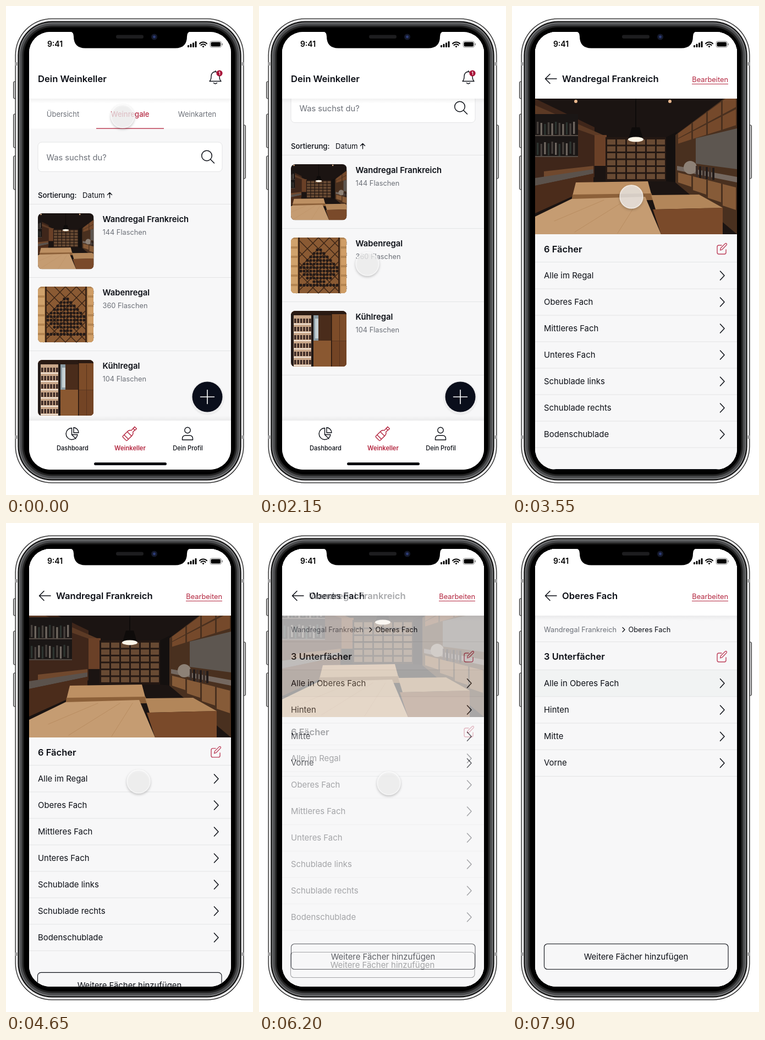
Recreate the animation shown at these times as an HTML page. Size 449 by 887 pixels, loop 8000 ms.

```html
<!DOCTYPE html>
<html lang="de">
<head>
<meta charset="utf-8">
<title>Weinkeller</title>
<style>
html, body { margin: 0; width: 100%; height: 100%; overflow: hidden; background: #fff; }
svg { display: block; font-family: Inter, sans-serif; }
#touch { filter: drop-shadow(0 2.5px 2px rgba(0, 0, 0, .28)); }
</style>
</head>
<body>
<svg id="stage" width="449" height="887" viewBox="0 0 449 887"></svg>
<script>
(() => {
const INK = '#0b0e15', GRAY = '#6c7078', RED = '#b3263f', LINE = '#e3e4e5', PAGE = '#f7f7f8';

// Drawing helpers, each returns SVG markup
const rect = (x, y, w, h, fill, r = 0, more = '') =>
  `<rect x="${x}" y="${y}" width="${w}" height="${h}" rx="${r}" fill="${fill}" ${more}/>`;
const circle = (x, y, r, fill, more = '') => `<circle cx="${x}" cy="${y}" r="${r}" fill="${fill}" ${more}/>`;
const text = (x, y, str, size, weight = 400, fill = INK, anchor = 'start') =>
  `<text x="${x}" y="${y}" font-size="${size}" font-weight="${weight}" fill="${fill}" text-anchor="${anchor}">${str}</text>`;
const stroke = (d, color = INK, w = 1.5) =>
  `<path d="${d}" fill="none" stroke="${color}" stroke-width="${w}" stroke-linecap="round" stroke-linejoin="round"/>`;
const poly = (pts, fill) => `<path d="M${pts}z" fill="${fill}"/>`;
const rule = y => rect(42, y, 367, 1, LINE);
const group = (id, body) => `<g id="${id}">${body}</g>`;
const times = (n, fn) => Array.from({ length: n }, (_, i) => fn(i)).join('');
const grid = (x, y, cols, rows, dx, dy, w, h, fill) =>
  times(cols * rows, i => rect(x + i % cols * dx, y + Math.floor(i / cols) * dy, w, h, fill));

// Photos as flat scenes
function room() {
  const upper = x => 66 - (x - 255) * .75, lower = x => 84 - (x - 255) * .3;
  const crate = (a, b, p, q) => {
    const y = (x, f) => upper(x) + (lower(x) - upper(x)) * f;
    return poly(`${a} ${y(a, p)}L${b} ${y(b, p)} ${b} ${y(b, q)} ${a} ${y(a, q)}`, '#75492b');
  };
  return rect(0, 0, 367, 246, '#1b1412')
    + poly('0 0L108 52 108 142 0 200', '#3f261a')
    + poly('0 12L128 68 128 74 0 28', '#5c3a25')
    + rect(0, 28, 78, 78, '#1a1615')
    + times(22, i => rect(3 + i % 11 * 6.6, (i < 11 ? 42 : 78) + i * 7 % 5, 3.4, 22, ['#46403c', '#6d655e', '#2d3430'][i % 3]))
    + rect(0, 66, 78, 2, '#554b44') + rect(0, 104, 78, 2, '#554b44')
    + rect(108, 66, 22, 56, '#6a4027')
    + poly('16 132L106 122 106 132 16 146', '#70482d')
    + poly('0 144L106 128 106 136 0 158', '#5b524c')
    + poly('0 158L106 136 106 160 0 208', '#4b2c1b')
    + rect(128, 70, 130, 80, '#241813') + grid(131, 74, 7, 6, 18, 12.5, 15, 9.5, '#684a33')
    + poly('238 70L258 60 258 152 238 150', '#14100f')
    + poly('255 66L367 -18 367 246 255 152', '#49301f')
    + times(4, i => { const a = 260 + i * 27; return crate(a, a + 24, .04, .47) + crate(a, a + 24, .53, .96); })
    + poly('292 72L367 54 367 128 292 118', '#5d5650')
    + poly('258 122L367 142 367 152 258 130', '#746860')
    + circle(282, 125, 12, '#8d8176')
    + times(6, i => rect(292 + i * 6, 122 + i * .7, 4, 22, i % 2 ? '#221b1a' : '#3a2d28'))
    + times(4, i => poly(`${260 + i * 27} ${134 + i * 7}l24 6v${20 + i * 7}l-24 -8`, '#865b38'))
    + poly('68 176L74 152 205 150 212 176', '#bd9063')
    + poly('68 174L212 172 214 184 66 186', '#8c6039')
    + poly('0 214L66 182 200 178 229 246 0 246', '#c59c72')
    + stroke('M35 222L125 184M72 242L165 184M150 244L188 184', '#b98d61', 1)
    + poly('211 175L298 174 341 198 219 201', '#b2865a')
    + poly('214 201L341 198 341 246 229 246', '#7a4a2a')
    + rect(182, 0, 2, 58, '#0e0b0a') + poly('170 72L176 52 190 52 196 72', '#0e0b0a')
    + '<ellipse cx="183" cy="74" rx="14" ry="4.5" fill="#fff6e8"/>'
    + circle(74, 5, 3, '#e9b78d') + circle(245, 5, 3, '#e9b78d');
}

function lattice() {
  const diagonals = times(9, i => stroke(`M${i * 20 - 50} 0l100 101M${i * 20 - 50} 101l100 -101`, '#3a2416', 1.4));
  const bottles = times(144, i => {
    const x = 18 + i % 12 * 6, y = 16 + Math.floor(i / 12) * 6.4;
    return Math.abs(x - 51) + Math.abs(y - 55) < 40 || y > 82 ? circle(x, y, 2.6, '#241a17') : '';
  });
  return rect(0, 0, 101, 101, '#8a5a33') + diagonals + bottles
    + rect(0, 0, 13, 101, '#b48552') + grid(0, 3, 1, 6, 0, 17, 12, 13, '#d0a26c')
    + rect(89, 0, 12, 101, '#b48552') + grid(91, 3, 1, 6, 0, 17, 10, 13, '#cf9d66')
    + rect(13, 0, 3, 101, '#3c2517') + rect(86, 0, 3, 101, '#3c2517');
}

function cooler() {
  return rect(0, 0, 101, 101, '#5d3922') + rect(0, 0, 101, 8, '#2a1a13')
    + rect(0, 8, 38, 93, '#c9a78a') + grid(6, 14, 6, 6, 5.4, 15, 3.6, 8, '#3d2a25')
    + grid(5, 23, 1, 6, 0, 15, 34, 2, '#f0e3d6')
    + rect(0, 6, 5, 95, '#241b19') + rect(37, 6, 4, 95, '#1f1715')
    + rect(41, 8, 12, 50, '#8a99a1') + rect(44, 14, 6, 36, '#c5d0d4')
    + rect(41, 54, 33, 47, '#8a5831') + rect(50, 8, 23, 46, '#4a2c1b')
    + rect(74, 6, 27, 48, '#7d4c29') + rect(74, 55, 27, 46, '#734425')
    + rect(73, 0, 1.5, 101, '#24150e') + rect(88, 8, 1, 93, '#5a341d');
}

const roomPhoto = (x, y, w, h) =>
  `<svg x="${x}" y="${y}" width="${w}" height="${h}" viewBox="0 0 367 246" preserveAspectRatio="xMidYMid slice">${room()}</svg>`;

// Shared interface parts
const header = rect(42, 40, 367, 128, '#fff');
const shade = rect(42, 168, 367, 9, 'url(#down)');
const back = stroke('M81 132H60.5M69 123.5L60.5 132 69 140.5');
const edit = text(393, 138, 'Bearbeiten', 12.8, 400, RED, 'end') + rect(327, 141, 66, 1, RED);
const pencil = y => stroke(`M381 ${y - 7}h-5q-3 0 -3 3v10q0 3 3 3h10q3 0 3 -3v-5`, '#bd3f5a', 1.4)
  + stroke(`M378.5 ${y + 2}l1 -4 8 -8q1.5 -1 2.5 0t0 2.5l-8 8.3z`, '#bd3f5a', 1.3);
const row = (y, label) => text(58, y + 5.5, label, 14.9) + stroke(`M378.5 ${y - 7.5}l7.5 8 -7.5 8`) + rule(y + 24);
const addButton = (x, y) => rect(x + .5, y + .5, 334.5, 46, 'none', 6, `stroke="${INK}" stroke-width="1.1"`)
  + text(x + 167.5, y + 29, 'Weitere Fächer hinzufügen', 14.9, 400, INK, 'middle');

const shelf = (i, name, count, art) => {
  const y = 359 + i * 133;
  return `<g transform="translate(58 ${y + 17})" clip-path="url(#thumb)">${art}</g>`
    + text(175.5, y + 33, name, 14.8, 600) + text(175.5, y + 56, count + ' Flaschen', 12.8, 400, GRAY) + rule(y + 133);
};

const bell = stroke('M370 136.5q3 -2.5 3 -9c0 -11 15 -11 15 0q0 6.5 3 9zM377.5 139.5q3 3 6 0M380.5 119v-1.5', INK, 1.4)
  + circle(388, 122, 5.6, '#a8163a') + text(388, 125, '1', 8, 600, '#fff', 'middle');
const bottle = stroke('M-2.5 -15h5v4h-5zM-2 -11v5q-3.5 2 -3.5 6v12q0 1.5 1.5 1.5h8q1.5 0 1.5 -1.5v-12q0 -4 -3.5 -6v-5M-5.5 1h11v8h-11', RED, 1.4);
const nav = rect(42, 743, 367, 9, 'url(#up)') + rect(42, 752, 367, 92, '#fff')
  + stroke('M119.5 765.5a10.5 10.5 0 1 0 10.5 12h-10.5zM119.5 777.5l7.5 7.5M123 764.5a10 10 0 0 1 9 9.5h-9z', INK, 1.4)
  + `<g transform="translate(225 775.5) rotate(45)">${bottle}</g>`
  + circle(330, 769.5, 5.2, 'none', `stroke="${INK}" stroke-width="1.4"`)
  + stroke('M320.5 787v-2q0 -6 6 -6h7q6 0 6 6v2z', INK, 1.4)
  + text(121, 806, 'Dashboard', 11.1, 500, INK, 'middle') + text(225.5, 806, 'Weinkeller', 11.2, 600, RED, 'middle')
  + text(330.5, 806, 'Dein Profil', 11.1, 500, INK, 'middle') + rect(160, 828, 132, 5, '#080a10', 2.5);

const cellar = rect(42, 40, 367, 804, PAGE)
  + group('cellarScroll', rect(42, 168, 367, 54.5, '#fff')
    + text(103.5, 201, 'Übersicht', 13, 400, GRAY, 'middle') + text(225.5, 201, 'Weinregale', 13, 500, RED, 'middle')
    + text(347.5, 201, 'Weinkarten', 13, 400, GRAY, 'middle') + rect(164, 221.5, 123, 1.3, RED)
    + rect(58, 247, 335, 53.5, '#fff', 7, `stroke="${LINE}"`) + text(73.5, 279.5, 'Was suchst du?', 14.7, 400, GRAY)
    + circle(365, 271.5, 9.3, 'none', `stroke="${INK}" stroke-width="1.5"`) + stroke('M372 278.5l6.5 6.5')
    + text(58, 348, 'Sortierung:', 13.2, 500) + text(139, 348, 'Datum', 13.2) + stroke('M188.5 348v-9.5M184.5 342.5l4 -4 4 4', INK, 1.3)
    + rule(359)
    + shelf(0, 'Wandregal Frankreich', 144, roomPhoto(0, 0, 101.5, 101.5))
    + shelf(1, 'Wabenregal', 360, lattice()) + shelf(2, 'Kühlregal', 104, cooler()))
  + shade + header + text(58, 138, 'Dein Weinkeller', 16.6, 600) + bell
  + circle(366, 711, 31, '#000', 'opacity=".04"') + circle(366, 709, 27.5, '#0a0e1b')
  + stroke('M353.5 709h25M366 696.5v25', '#fff', 1.6) + nav;

const rack = rect(42, 40, 367, 804, PAGE)
  + group('rackScroll', roomPhoto(42, 168, 367, 246)
    + text(58, 447, '6 Fächer', 16.5, 600) + pencil(441) + rule(464)
    + ['Alle im Regal', 'Oberes Fach', 'Mittleres Fach', 'Unteres Fach', 'Schublade links', 'Schublade rechts', 'Bodenschublade']
      .map((label, i) => row(488.5 + i * 48, label)).join('') + addButton(57, 840))
  + header + back + text(91, 138, 'Wandregal Frankreich', 16.6, 600) + edit;

const shelfPage = rect(42, 40, 367, 804, PAGE) + shade + header + back + text(91, 138, 'Oberes Fach', 16.6, 600) + edit
  + text(58, 197.5, 'Wandregal Frankreich', 12.8, 400, GRAY) + stroke('M201 189.5l4 4 -4 4', INK, 1.3)
  + text(211.5, 197.5, 'Oberes Fach', 12.8) + rule(215)
  + text(58, 248, '3 Unterfächer', 16.5, 600) + pencil(243) + rule(266) + rect(42, 267, 367, 47, '#f1f3f3')
  + ['Alle in Oberes Fach', 'Hinten', 'Mitte', 'Vorne'].map((label, i) => row(290.3 + i * 48.2, label)).join('')
  + addButton(58, 763);

// Phone body, from the outside in
const shell = [[0, '#1c1c1c'], [1.3, '#eeeeef'], [5, '#050505'], [7, '#77787a'], [9, '#4b4c4e'], [13, '#222'], [16, '#000']];
const side = (x, y, h) => rect(x, y, 5, h, '#c9c9ca', 2, 'stroke="#222"');
const phone = side(13.5, 137, 31) + side(13.5, 196, 61) + side(13.5, 272, 61) + side(430.5, 216, 97)
  + shell.map(([d, c]) => rect(16.5 + d, 22.5 + d, 416 - 2 * d, 843 - 2 * d, c, 67 - d)).join('')
  + [102, 779].map(y => rect(16, y, 5.5, 6, '#a3a3a4') + rect(427.5, y, 5.5, 6, '#a3a3a4')).join('');
const statusBar = '<path d="M116 46q7 1 7 9c0 14 7 21.5 21 21.5h164c14 0 21 -7.5 21 -21.5q0 -8 7 -9z"/>'
  + rect(200, 52.5, 50, 6.5, '#1d1d1f', 3.2) + circle(269.5, 56, 5.5, '#151a2c') + circle(269.5, 56, 2.4, '#2d3d78')
  + text(89, 74, '9:41', 14, 600, '#000', 'middle')
  + times(4, i => rect(330 + i * 4.5, 71 - i * 2.3, 3, 4 + i * 2.3, '#000', 1))
  + stroke('M352 68.3a9 9 0 0 1 13 0M354.4 71a5.6 5.6 0 0 1 8.2 0', '#000', 2)
  + poly('356.5 73.2l2 2.2 2 -2.2a3 3 0 0 0 -4 0', '#000')
  + rect(371, 64, 20.5, 11, 'none', 3.3, 'stroke="#8b8b8b"') + rect(372.5, 65.5, 17.5, 8, '#000', 2) + rect(392.5, 67.5, 1.6, 4, '#8b8b8b', .8);

const fade = (id, y1, y2) => `<linearGradient id="${id}" x1="0" x2="0" y1="${y1}" y2="${y2}">`
  + '<stop stop-opacity=".05"/><stop offset="1" stop-opacity="0"/></linearGradient>';

document.getElementById('stage').innerHTML = `<defs>${fade('down', 0, 1)}${fade('up', 1, 0)}
  <clipPath id="screen">${rect(42, 47, 367, 794, '#000', 38)}</clipPath>
  <clipPath id="thumb">${rect(0, 0, 101.5, 101.5, '#000', 8)}</clipPath></defs>`
  + phone + `<g clip-path="url(#screen)">${group('cellar', cellar)}${group('rack', rack)}${group('shelfPage', shelfPage)}
  ${group('touch', circle(0, 0, 21, 'rgba(250,250,250,.74)', 'stroke="#fff" stroke-opacity=".7" stroke-width="1.5"'))}</g>` + statusBar;

// Timeline
const LOOP = 8000;
const part = (t, a, b) => Math.min(1, Math.max(0, (t - a) / (b - a)));
const smooth = (t, a, b) => { const p = part(t, a, b); return p * p * (3 - 2 * p); };
const out = (t, a, b) => 1 - (1 - part(t, a, b)) ** 3;

// Touch moves: start, end, x, y
const moves = [[650, 1050, 197, 468], [2550, 3050, 217, 346], [3850, 4400, 241, 469],
  [5650, 6000, 236, 472], [7100, 7450, 172, 262], [7450, 7700, 187, 339]];

const el = id => document.getElementById(id);
const shift = (id, x, y) => el(id).setAttribute('transform', `translate(${x} ${y})`);
const show = (id, alpha) => {
  el(id).setAttribute('opacity', alpha);
  el(id).setAttribute('display', alpha ? 'inline' : 'none');
};

function draw(t) {
  let x = 212, y = 200;
  for (const [a, b, toX, toY] of moves) {
    const p = smooth(t, a, b);
    x += (toX - x) * p;
    y += (toY - y) * p;
  }
  shift('touch', x, y);
  show('touch', t < 6600 || t >= 7100 && t < 7900 ? 1 : 0);
  shift('cellarScroll', 0, -89 * smooth(t, 1650, 2150));
  shift('rackScroll', 0, -33 * out(t, 4560, 4800) - 29 * out(t, 5160, 5500));
  show('rack', out(t, 3260, 3400));
  show('shelfPage', out(t, 6160, 6300));
}

const start = performance.now();
function tick() {
  draw((performance.now() - start) % LOOP);
  requestAnimationFrame(tick);
}
tick();
})();
</script>
</body>
</html>
```
